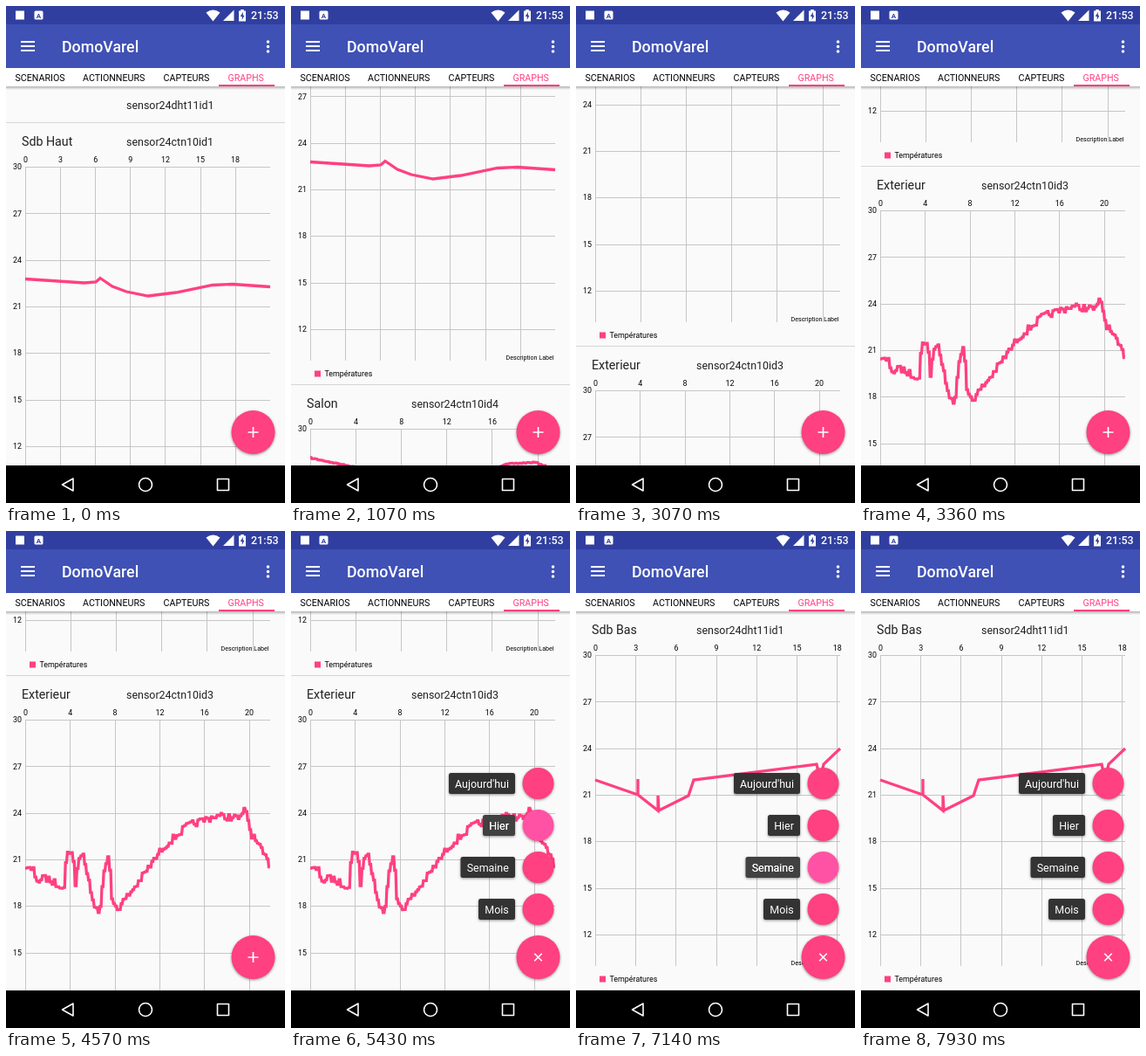
Recreate the animation shown at these times as an HTML page. Size 320 by 569 pixels, loop 8 s.

```html
<!DOCTYPE html>
<html lang="fr">
<head>
<meta charset="utf-8">
<title>Graphs</title>
<style>
html, body { margin: 0; width: 100%; height: 100%; overflow: hidden; background: #000; }
svg { display: block; width: 100vw; height: 100vh; font-family: Roboto, sans-serif; }
.axis { font-size: 8.89px; fill: #000; }
.mid { text-anchor: middle; }
.end { text-anchor: end; }
.grid { stroke: #c6c6c6; fill: none; shape-rendering: crispEdges; }
.curve { stroke: #ff4081; stroke-width: 3.3; fill: none; }
.tab { font-size: 10.67px; }
.chip { font-size: 12.44px; fill: #fff; }
.shade { filter: drop-shadow(0 1.8px 1.6px rgba(0, 0, 0, .42)); }
.pink { fill: #ff4081; }
</style>
</head>
<body>
<svg viewBox="0 0 320 569">
  <defs>
    <linearGradient id="fade" x2="0" y2="1">
      <stop offset="0" stop-opacity=".28"/><stop offset="1" stop-opacity="0"/>
    </linearGradient>
  </defs>
  <rect width="320" height="569" fill="#fafafa"/>
  <g id="list"></g>
  <rect y="92" width="320" height="4" fill="url(#fade)"/>

  <rect width="320" height="22" fill="#303f9f"/>
  <rect y="21" width="320" height="50" fill="#3f51b5"/>
  <g fill="#fff">
    <rect x="11" y="5.5" width="10" height="10"/>
    <rect x="32.5" y="5.5" width="10" height="10" rx="1.5"/>
    <path d="M229.5 7.5Q237.5 1.5 245.5 7.5L237.5 17.5Z"/>
    <path d="M261.5 4.5V17H249Z"/>
    <path d="M267 5.5H269.2V4H272.8V5.5H275V17.5H267Z"/>
    <path d="M17 41H33M17 46H33M17 51H33" stroke="#fff" stroke-width="2"/>
    <path d="M300.5 41v0m0 5.5v0m0 5.5v0" stroke="#fff" stroke-width="3.6" stroke-linecap="round"/>
    <text x="281" y="15" font-size="12.44" font-weight="500">21:53</text>
    <text x="64" y="53" font-size="17.78" font-weight="500">DomoVarel</text>
  </g>
  <path d="M271.8 6.8L268.8 12H270.7V16L273.5 10.7H271.8Z" fill="#303f9f"/>
  <text x="37.5" y="13.5" class="mid" font-size="8" font-weight="700" fill="#303f9f">A</text>

  <rect y="71" width="320" height="21" fill="#fff"/>
  <text class="tab" x="10.5" y="86">SCENARIOS</text>
  <text class="tab" x="88" y="86">ACTIONNEURS</text>
  <text class="tab" x="180.5" y="86">CAPTEURS</text>
  <text class="tab pink" x="254.5" y="86">GRAPHS</text>
  <rect class="pink" x="244" y="90" width="64" height="2"/>

  <g id="menu"></g>
  <circle class="pink shade" cx="283.5" cy="488" r="25"/>
  <path id="plus" d="M-6 0H6M0 -6V6" stroke="#fff" stroke-width="1.7"/>

  <rect y="526" width="320" height="43"/>
  <g fill="none" stroke="#fff" stroke-width="1.6" stroke-linejoin="round">
    <path d="M64.5 548L77 541V555Z"/>
    <circle cx="160" cy="548" r="7.5"/>
    <rect x="242.5" y="541.5" width="13" height="13"/>
  </g>
</svg>
<script>
const $ = id => document.getElementById(id);
const clamp = v => Math.max(0, Math.min(1, v));
const smooth = v => v * v * (3 - 2 * v);
const overshoot = v => 1 + (v - 1) ** 2 * (3 * (v - 1) + 2);

let seed = 7;
const random = () => (seed = seed * 16807 % 2147483647) / 2147483647;

// A trend line read by a noisy sensor that holds each reading for a moment.
function readings(trend, noise) {
  const keys = trend.split(' ').map(s => s.split(',').map(Number));
  let path = '';
  for (let x = keys[0][0], i = 0; x < 303; x += 2.2) {
    while (x > keys[i + 1][0]) i++;
    const [[x0, y0], [x1, y1]] = keys.slice(i, i + 2);
    const y = y0 + (y1 - y0) * (x - x0) / (x1 - x0) + noise * (2 * random() - 1);
    path += `${x},${y} ${x + 1.3},${y} `;
  }
  return path;
}

// Curves: x on the stage, y below the 30 degree line.
const bas = '22,143 71,160 71,142 71,160 94,178 94,161 95,178 129,161 135,143 276,125 280,143 284,125 303,107';
const haut = '22,128.5 90,133 103,132 108,127.5 122,137 138,143 163,148 195,144 237,135.5 260,134.5 303,137.5';
const salon = readings('22,33.5 68,43 112,54.5 128,69 158,69.5 205,52 250,40 280,38.5 303,47.5', .5);
const exterieur = readings('22,172 30,171 36,185 45,181 57,188 66,190 69,155 76,148 79,194 83,156 88,155 ' +
  '93,177 101,217 107,217 113,163 118,158 121,208 128,216 150,188 180,146 207,122 240,110 270,113 ' +
  '274,99 280,129 303,168', 4);

// Title, sensor, hours per column, column width, curve.
const items = [
  ['Sdb Bas', 'dht11id1', 3, 46.2, bas],
  ['Sdb Haut', 'ctn10id1', 3, 40.1, haut],
  ['Salon', 'ctn10id4', 4, 52.1, salon],
  ['Exterieur', 'ctn10id3', 4, 51.3, exterieur]
];
const pitch = 434;

function card([title, sensor, hours, gap, curve]) {
  let grid = '', labels = '';
  for (let i = 0; i < 7; i++) {
    const x = 22.5 + i * gap, y = 29.5 + i * 53.3;
    grid += `M22.5 ${y}H303`;
    labels += `<text class="axis end" x="18" y="${y + 2.7}">${30 - i * 3}</text>`;
    if (x > 303) continue;
    grid += `M${x} 29V384.5`;
    labels += `<text class="axis mid" x="${x}" y="23.7">${i * hours}</text>`;
  }
  return `<g><path d="M0 -21.5H320" stroke="#d6d6d6"/>
    <text x="138" y="4.5" font-size="12.44" fill="#212121">sensor24${sensor}</text>
    <g><text x="18" y="5" font-size="14.22" fill="#212121">${title}</text>
    <path class="grid" d="${grid}"/>${labels}
    <polyline class="curve" points="${curve}" transform="translate(0 29)"/>
    <text class="end" x="301.5" y="383.5" font-size="7.11">Description Label</text>
    <rect class="pink" x="27" y="396.5" width="7" height="7"/>
    <text class="axis" x="38.5" y="403.3">Températures</text></g></g>`;
}
$('list').innerHTML = items.map(card).join('');
const cards = [...$('list').children];
cards[0].firstElementChild.remove();

// Nearest to the button first, with the left edge of each label.
const options = [['Mois', 215], ['Semaine', 194.5], ['Hier', 220], ["Aujourd'hui", 181]];
$('menu').innerHTML = options.map(([name, x]) => `<g>
  <g><circle class="pink shade" r="18"/></g>
  <g><rect class="shade" x="${x}" y="-12" width="${257 - x}" height="24" rx="2.5" fill="#333"/>
  <text class="chip mid" x="${(x + 257) / 2}" y="4.5">${name}</text></g></g>`).join('');
const rows = [...$('menu').children];

// Time runs in ticks of 1/14 s. Swipes: first tick, number of ticks, distance.
const swipes = [[13, 6, 269], [27, 4, 315], [33, 2, 10], [43, 6, 242]];
const openTick = 66, reloadTick = 84;
const presses = [[76, 'Hier'], [100, 'Semaine']];

function draw(tick) {
  const loaded = tick >= reloadTick;
  const scroll = loaded ? 0 : swipes.reduce((s, [at, n, d]) => s + d * smooth(clamp((tick - at + 1) / n)), 0);
  cards.forEach((c, i) => {
    const top = i && !loaded ? 155 + (i - 1) * pitch : 113 + i * pitch;
    c.setAttribute('transform', `translate(0 ${Math.round(top - scroll)})`);
  });
  cards[0].lastElementChild.style.display = loaded ? '' : 'none';

  const ms = (tick - openTick) * 1000 / 14;
  rows.forEach((row, i) => {
    const p = clamp((ms - i * 50) / 200);
    const [dot, chip] = row.children;
    const press = presses.find(([at, name]) => name === options[i][0] && tick >= at);
    const glow = press ? clamp(1 - (tick - press[0]) / 11) : 0;
    row.setAttribute('transform', `translate(0 ${433 - i * 48})`);
    row.style.display = p > 0 ? '' : 'none';
    row.style.filter = glow ? `brightness(${1 + .28 * glow})` : 'none';
    dot.setAttribute('transform', `translate(283.5 0) scale(${p})`);
    chip.setAttribute('transform', `translate(${(1 - p) * 12} 0)`);
    chip.setAttribute('opacity', p);
  });
  const turn = -135 * overshoot(clamp(ms / 300));
  $('plus').setAttribute('transform', `translate(283.5 488) rotate(${turn})`);
}

const start = performance.now();
function frame(now) {
  const t = Math.max(0, now - start) % 8000;
  draw(Math.floor((t + 3) * 14 / 1000) % 112);
  requestAnimationFrame(frame);
}
draw(0);
requestAnimationFrame(frame);
</script>
</body>
</html>
```
